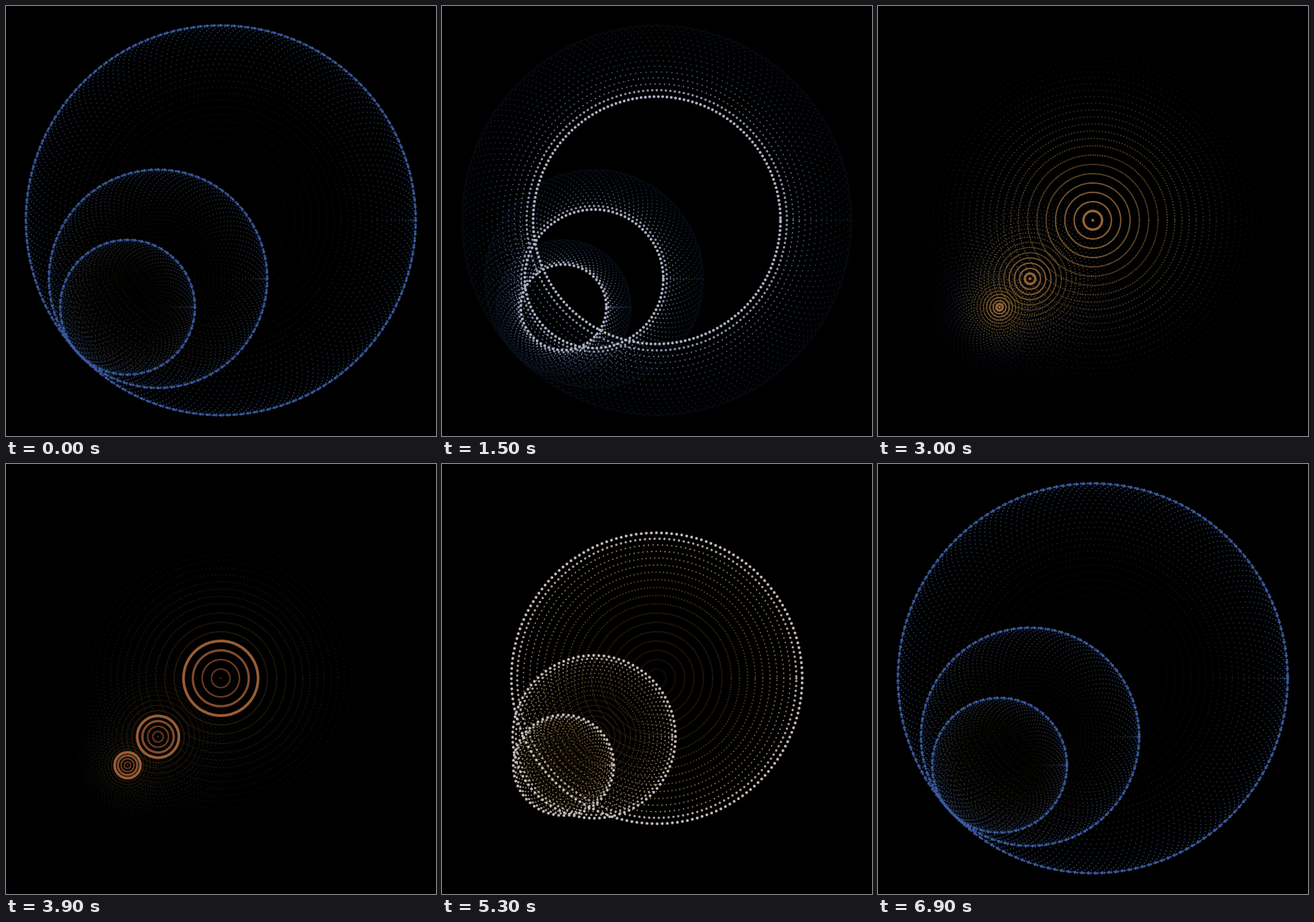
These frames come from a looping animation (600 px wide and 600 px high, 7000 ms). An HTML page with a canvas:

```html
<!DOCTYPE html>
<html lang="en">
<head>
<meta charset="utf-8">
<title>Pulsing dot rings</title>
<style>
  html, body { margin: 0; width: 100%; height: 100%; overflow: hidden; background: #000; }
  canvas { display: block; width: 600px; height: 600px; }
</style>
</head>
<body>
<canvas id="stage" width="600" height="600"></canvas>
<script>
const ctx = document.getElementById('stage').getContext('2d');
const TAU = Math.PI * 2;
const STEP = 100, STEPS = 70, TRAIL = 28, FADE = 0.89;
const MAX_RADIUS = 272, NEAR_RADIUS = 104;
const GAPS_PER_LOOP = 25; // every dot travels this many dot gaps per loop

// The rings touch at the lower left when fully open.
const TILT = 137 * Math.PI / 180;
const rings = [[1, 180], [0.56, 100], [0.346, 60]].map(([scale, dots]) => ({
  scale, dots,
  x: 299.7 + MAX_RADIUS * (1 - scale) * Math.cos(TILT),
  y: 299 + MAX_RADIUS * (1 - scale) * Math.sin(TILT)
}));

const palette = [
  { at: 0, rgb: [125, 58, 38] },
  { at: 0.33, rgb: [208, 160, 82] },
  { at: 0.54, rgb: [192, 188, 198] },
  { at: 0.74, rgb: [72, 112, 180] },
  { at: 1, rgb: [58, 90, 158] }
];

const mix = (a, b, k) => a + (b - a) * k;

// Close slowly then faster, rest at the centre, open and slow down.
function radiusAt(step) {
  if (step < 22) return mix(MAX_RADIUS, NEAR_RADIUS, (step / 22) ** 1.37);
  if (step < 30) return NEAR_RADIUS * (30 - step) / 8;
  if (step < 35) return 0;
  if (step < 43) return NEAR_RADIUS * (step - 35) / 8;
  return mix(MAX_RADIUS, NEAR_RADIUS, (Math.max(0, 68 - step) / 25) ** 1.74);
}

function colorAt(step, light) {
  const u = Math.abs(step / STEPS * 2 - 1);
  const i = Math.max(1, palette.findIndex(stop => stop.at >= u));
  const a = palette[i - 1], b = palette[i];
  const k = (u - a.at) / (b.at - a.at);
  return `rgb(${a.rgb.map((v, c) => Math.round(mix(v, b.rgb[c], k) * light))})`;
}

function drawDot(x, y, size, round) {
  if (round) {
    ctx.moveTo(x + size / 2, y);
    ctx.arc(x, y, size / 2, 0, TAU);
  } else {
    ctx.rect(x - size / 2, y - size / 2, size, size);
  }
}

function drawEcho(step, age) {
  const radius = radiusAt(step);
  const round = age < 2;
  const size = round ? 4 - age * 0.6 : 1.8;
  ctx.fillStyle = colorAt(step, FADE ** age);
  ctx.beginPath();
  for (const { x, y, scale, dots } of rings) {
    const r = radius * scale;
    for (let i = 0; i < dots; i++) {
      const a = (i + step / STEPS * GAPS_PER_LOOP) / dots * TAU;
      drawDot(x + r * Math.cos(a), y + r * Math.sin(a), size, round);
    }
    // The seam of each ring stays on the horizontal axis.
    drawDot(x + r, y, size, round);
  }
  ctx.fill();
}

function draw(step) {
  ctx.fillStyle = '#000';
  ctx.fillRect(0, 0, 600, 600);
  for (let age = TRAIL; age >= 0; age--) drawEcho((step - age + STEPS) % STEPS, age);
}

const start = performance.now();
let shown = -1;

function tick() {
  const step = Math.floor((performance.now() - start) / STEP) % STEPS;
  if (step !== shown) draw(shown = step);
  requestAnimationFrame(tick);
}
tick();
</script>
</body>
</html>
```
